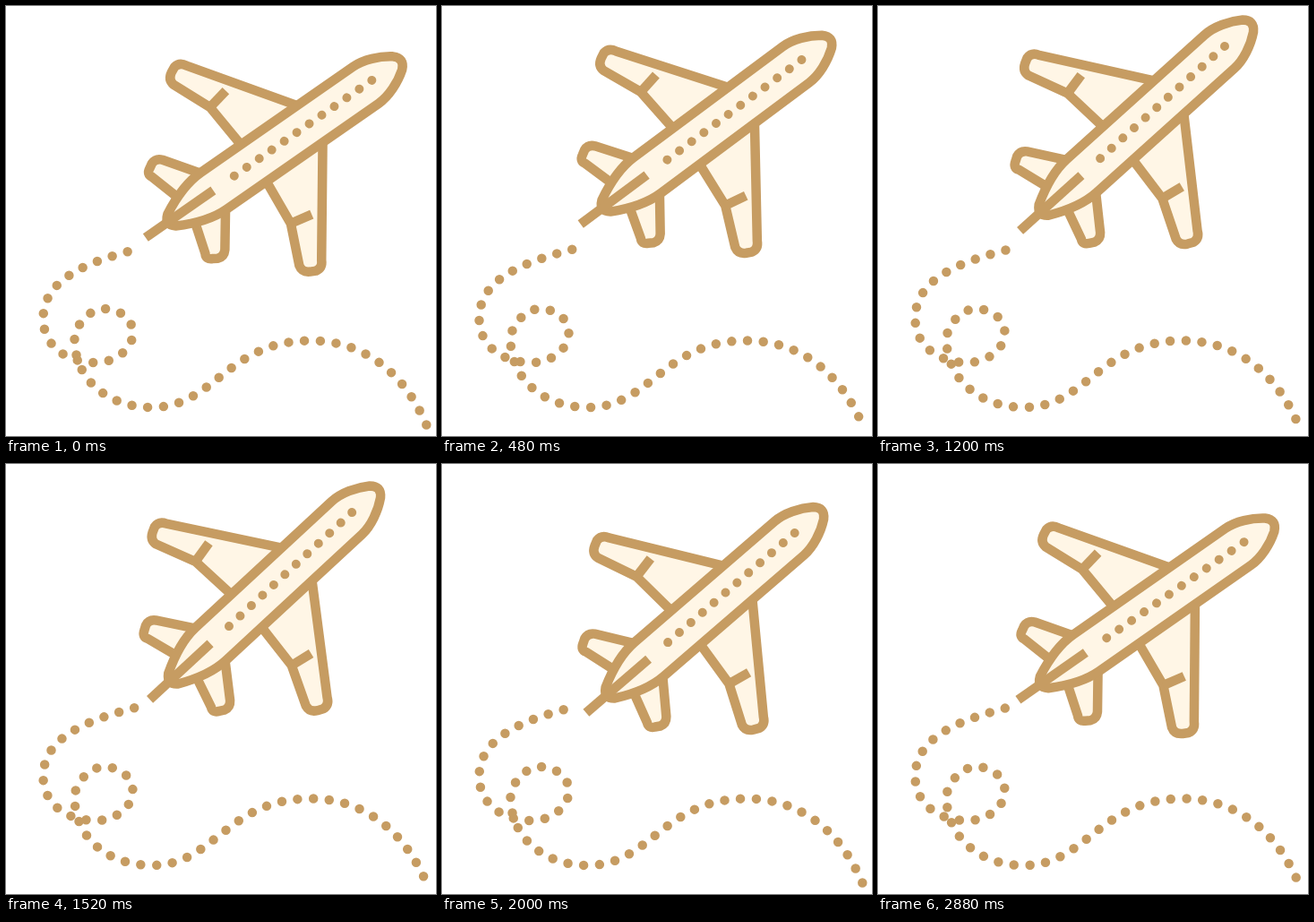
An HTML page that plays this animation: 480x480 px, repeating every 2960 ms.

```html
<!DOCTYPE html>
<html lang="en">
<head>
<meta charset="utf-8">
<title>Plane</title>
<style>
  html, body { margin: 0; width: 100%; height: 100%; overflow: hidden; background: #fff; }
  svg { display: block; width: 100vw; height: 100vh; }
  path { stroke: #c69c62; stroke-width: 10.5; stroke-linejoin: round; fill: #fff6e6; }
  .dots { fill: none; stroke-linecap: round; }
  #trail { stroke-dasharray: 0 1; }
  #windows { stroke-width: 10; stroke-dasharray: 0 17; }
</style>
</head>
<body>
<svg viewBox="0 0 480 480">
  <defs>
    <g id="side">
      <path d="M9 25 L-67 132 Q-71 140 -79 138.5 L-85 135.5 Q-93 131 -91 123 L-72 79 L-67.5 25"/>
      <path d="M-72 79 L-47 84"/>
      <path d="M-121 22 L-149 61 Q-154 67 -161 64.5 L-166 61.5 Q-173 58 -169.5 52 L-159 17"/>
    </g>
  </defs>
  <!-- One unit of path length is one dot spacing. -->
  <path id="trail" class="dots" pathLength="49.98" d="M469.5 468
    C445 410 400 373.5 340 373.5 C247 373.5 233 448 163 448 C113 448 76.5 416 76.5 372
    C76.5 357 93 338 109 338 C127 338 141.5 349 141.5 365 C141.5 383 122 398 100 398
    C66 398 41.5 378 41.5 349 C41.5 304 92 285 152 270"/>
  <g id="plane">
    <use href="#side"/>
    <use href="#side" transform="scale(1 -1)"/>
    <path d="M-122 -25 H85 C99 -25 116 -18 128 -9 Q138 0 128 9 C116 18 99 25 85 25
      H-122 C-140 25 -160 18 -179 8 Q-189 0 -179 -8 C-160 -18 -140 -25 -122 -25 Z"/>
    <path d="M-214 -.6 H-122"/>
    <path id="windows" class="dots" d="M-93.5 -.6 H94"/>
  </g>
</svg>
<script>
  const FRAME = 80, FRAMES = 37, CYCLE = 3000;
  const DOTS_PER_CYCLE = 9, DOT_START = 0.03;
  const trail = document.getElementById('trail');
  const plane = document.getElementById('plane');

  function draw() {
    const turn = Math.floor(performance.now() / FRAME) % FRAMES * FRAME / CYCLE;
    const cos = Math.cos(2 * Math.PI * turn), sin = Math.sin(2 * Math.PI * turn);

    // The plane sways about its tail while it bobs a quarter cycle behind.
    const x = 324.9 + 7 * cos - 2.2 * sin;
    const y = 127 + 9.8 * cos - 18.9 * sin;
    plane.setAttribute('transform', `translate(${x} ${y}) rotate(${4 * cos - 38.8})`);
    trail.setAttribute('stroke-dashoffset', DOTS_PER_CYCLE * turn - DOT_START);

    requestAnimationFrame(draw);
  }
  draw();
</script>
</body>
</html>
```
